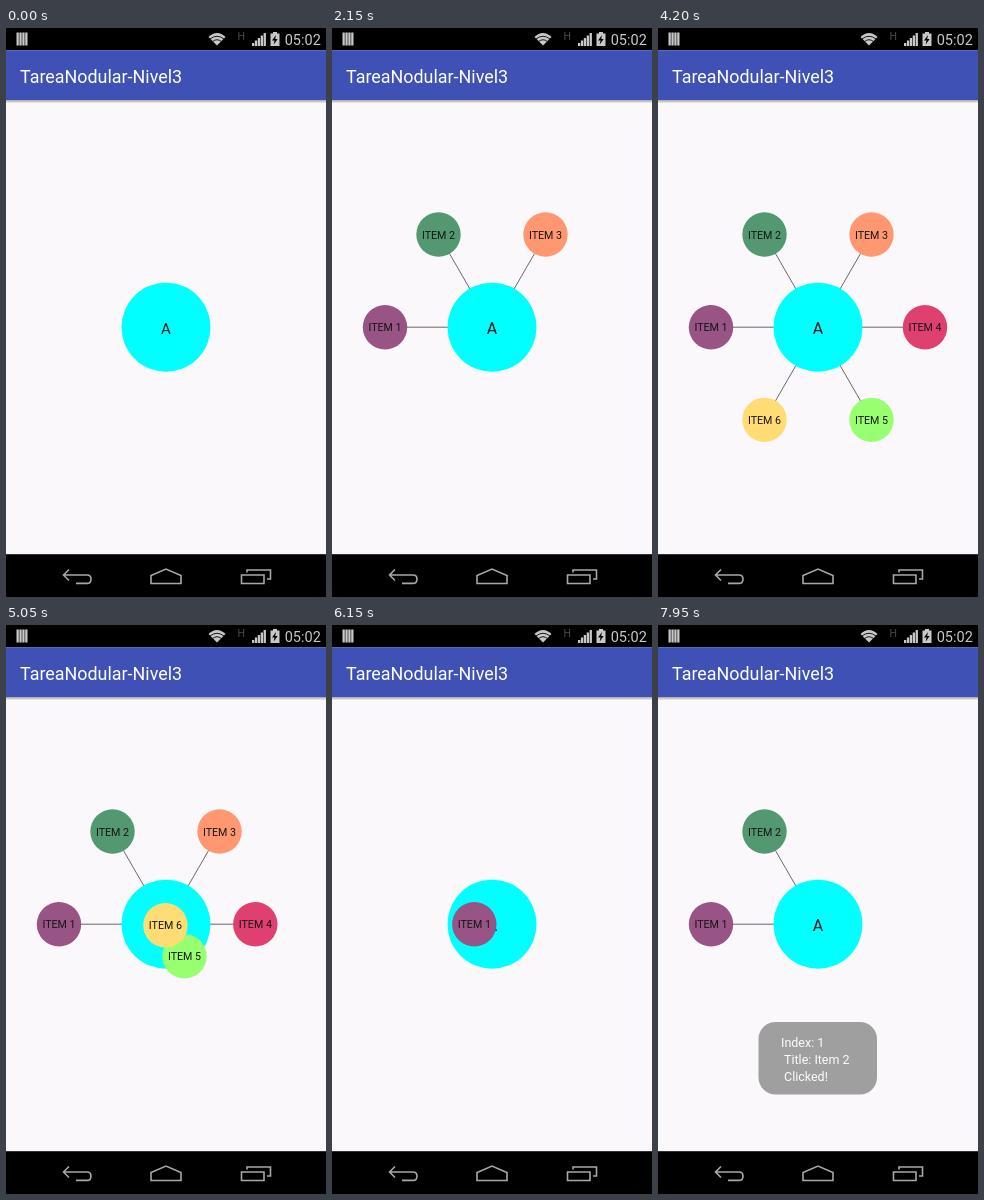
Recreate the animation shown at these times as an HTML page. Size 320 px wide and 569 px high, loop 8000 ms.

```html
<!DOCTYPE html>
<html lang="es">
<head>
<meta charset="utf-8">
<title>Radial items</title>
<style>
  html, body { margin: 0; width: 100%; height: 100%; overflow: hidden; background: #000; }
  svg { display: block; width: 100%; height: 100%; font-family: Roboto, sans-serif; }
  .item text, #hub { text-anchor: middle; fill: #151515; }
  .item text { font-size: 10.7px; }
  .nav { fill: none; stroke: #a8a8a8; stroke-width: 1.6; }
</style>
</head>
<body>
<svg viewBox="0 0 320 569">
  <defs>
    <linearGradient id="shade" x2="0" y2="1">
      <stop stop-color="#000" stop-opacity=".34"/>
      <stop offset="1" stop-color="#000" stop-opacity="0"/>
    </linearGradient>
  </defs>
  <rect width="320" height="569"/>
  <rect y="22.2" width="320" height="504" fill="#faf8fb"/>
  <rect y="72" width="320" height="3.5" fill="url(#shade)"/>
  <rect y="22.2" width="320" height="49.8" fill="#3f51b5"/>
  <text x="14" y="54.5" font-size="17.9" fill="#fff">TareaNodular-Nivel3</text>

  <g fill="#c8c8c8">
    <path d="M10.5 4.5h2.3v13h-2.3zm2.9 0h2.3v13h-2.3zm2.9 0h2.3v13h-2.3zm2.9 0h2.3v13h-2.3z"/>
    <path d="M202.5 9q8.500-8 17 0L211 17.500z"/>
    <path d="M204 11q7-5.500 14 0M206.500 13.500q4.500-3.500 9 0" fill="none" stroke="#000" stroke-width=".9"/>
    <path d="M246 15h2.300v3h-2.300zm2.900-2.500h2.300v5.500h-2.300zm2.900-2.500h2.300v8h-2.300zm2.900-2.500h2.300v10.500h-2.300zm2.900-2.500h2.300v13h-2.300z"/>
    <path d="M264.500 5.500h2.500v-1.500h4v1.500h2.500v12.500h-9z"/>
    <path d="M270 7l-4 5.500h2.500l-.8 4 4-5.500h-2.500z" fill="#000"/>
    <text x="278.700" y="17" font-size="14.500">05:02</text>
    <text x="231.500" y="12" font-size="10.500" fill="#4a4a4a">H</text>
  </g>

  <g class="nav">
    <path d="M63 541.500l-5.500 5.500 5.500 5.500M57.500 547H81q4 0 4 4.200t-4 4.200H70"/>
    <path d="M145 555.500v-8l15-6.500 15 6.500v8z"/>
    <path d="M235.500 547h22.500v8.500h-22.500zM241 544.500v-2.500h23.500v9h-3.500"/>
  </g>

  <g id="lines" stroke="#5a5a5a" stroke-width=".9"></g>
  <circle cx="160" cy="299.200" r="44.500" fill="#0ff"/>
  <text id="hub" x="160" y="305.700">A</text>
  <g id="items"></g>

  <g id="toast">
    <rect x="100.500" y="397" width="118.500" height="72.500" rx="17" fill="#323232"/>
    <g fill="#fff" font-size="12.500">
      <text x="123" y="422">Index: 1</text>
      <text x="126" y="438.500">Title: Item 2</text>
      <text x="126" y="455.500">Clicked!</text>
    </g>
  </g>
</svg>
<script>
const LOOP = 8000, STEP = 50, MOVE = 300, REACH = 107;
const CENTER = { x: 160, y: 299.2 };
const COLORS = ['#985485', '#539870', '#ff9870', '#e04070', '#98ff70', '#ffdc74'];
// Each entry: moment the item appears, moment it starts moving.
const FIRST = [[500, 520], [1200, 1184], [1800, 1820], [2500, 2520], [3200, 3220], [3850, 3870]];
const SECOND = [[6050, 6070], [6700, 6684]];
const CLOSE_START = 4770, CLOSE_GAP = 100;

const byId = id => document.getElementById(id);
const clamp = v => Math.min(1, Math.max(0, v));
const ease = v => (1 - Math.cos(Math.PI * clamp(v))) / 2;

function add(parent, tag, attrs) {
  const node = document.createElementNS('http://www.w3.org/2000/svg', tag);
  for (const key in attrs) node.setAttribute(key, attrs[key]);
  return parent.appendChild(node);
}

const items = COLORS.map((fill, i) => {
  const line = add(byId('lines'), 'line', { x1: CENTER.x, y1: CENTER.y });
  const group = add(byId('items'), 'g', { class: 'item' });
  add(group, 'circle', { r: 22.2, fill });
  add(group, 'text', { y: 4 }).textContent = `ITEM ${i + 1}`;
  return { line, group, angle: Math.PI * (1 + i / 3) };
});

// Returns how far out an item is (0..1), or -1 while it is absent.
function extent(i, t) {
  const closeAt = CLOSE_START + CLOSE_GAP * (5 - i);
  const opening = t < closeAt + MOVE ? FIRST[i] : SECOND[i];
  if (!opening || t < opening[0]) return -1;
  const out = ease((t - opening[1]) / MOVE);
  return opening === FIRST[i] ? out - ease((t - closeAt) / MOVE) : out;
}

function draw(t) {
  items.forEach(({ line, group, angle }, i) => {
    const part = extent(i, t);
    line.style.display = group.style.display = part < 0 ? 'none' : '';
    const x = CENTER.x + Math.cos(angle) * REACH * part;
    const y = CENTER.y + Math.sin(angle) * REACH * part;
    line.setAttribute('x2', x);
    line.setAttribute('y2', y);
    group.setAttribute('transform', `translate(${x} ${y})`);
  });
  byId('hub').setAttribute('font-size', t < 500 ? 15 : 16);
  byId('toast').setAttribute('opacity', clamp((t - 7780) / 380));
}

const start = performance.now();
function tick() {
  const t = (performance.now() - start) % LOOP;
  draw(Math.floor(t / STEP) * STEP);
  requestAnimationFrame(tick);
}
tick();
</script>
</body>
</html>
```
